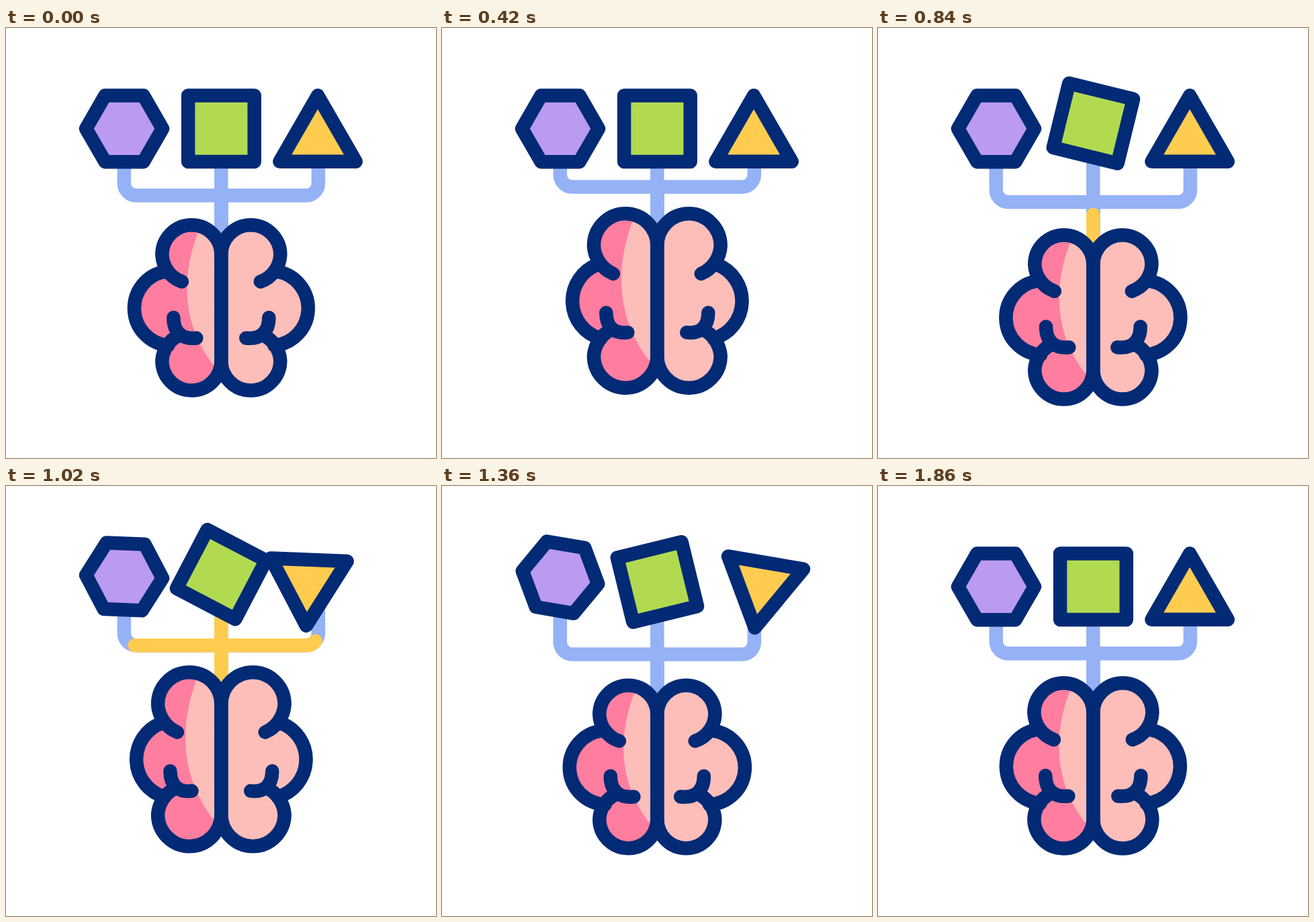
An HTML page that plays this animation: 640x640 px, repeating every 2200 ms.

```html
<!DOCTYPE html>
<html lang="en">
<head>
<meta charset="utf-8">
<title>Thinking in shapes</title>
<style>
  html, body { margin: 0; width: 100%; height: 100%; overflow: hidden; background: #fff; }
  svg { display: block; width: 100%; height: 100%; }
  .line { fill: none; stroke-width: 20.5; stroke-linecap: round; stroke-linejoin: round; }
  .navy { stroke: #032a75; }
  .blue { stroke: #94b2f5; }
  .gold { stroke: #ffcc50; }
  .shape { stroke: #032a75; stroke-width: 20.5; stroke-linejoin: round; }
</style>
</head>
<body>
<svg viewBox="0 0 640 640">
  <defs><clipPath id="half"><path id="halfClip"/></clipPath></defs>
  <g id="wires"></g>
  <g id="shapes">
    <path class="shape" fill="#bb9af1" d="M-57 0L-28.5 -49.4H28.5L57 0L28.5 49.4H-28.5Z"/>
    <path class="shape" fill="#b1da51" d="M-49.3 -49.3H49.3V49.3H-49.3Z"/>
    <path class="shape" fill="#ffcc50" d="M0 -49.3L56.7 49H-56.7Z"/>
  </g>
  <g id="brain">
    <path id="fillL" fill="#fdbeb9"/>
    <path id="fillR" fill="#fdbeb9" transform="matrix(-1 0 0 1 640 0)"/>
    <path id="shade" fill="#ff7d9f" clip-path="url(#half)"/>
    <path id="lineL" class="line navy"/>
    <path id="lineR" class="line navy" transform="matrix(-1 0 0 1 640 0)"/>
  </g>
</svg>
<script>
const LOOP = 2200, STEP = 20, AXIS = 320.3;
const $ = id => document.getElementById(id);
const set = (el, attrs) => { for (const k in attrs) el.setAttribute(k, attrs[k]); };

const smooth = u => u * u * (3 - 2 * u);
const easeIn = u => u * u;
const easeOut = u => u * (2 - u);
const clamp = u => Math.min(1, Math.max(0, u));
const ramp = (t, start, length) => smooth(clamp((t - start) / length));

// keys: [time, value, easing towards this key]
function track(t, keys) {
  if (t <= keys[0][0]) return keys[0][1];
  for (let i = 1; i < keys.length; i++) {
    const [t0, v0] = keys[i - 1], [t1, v1, ease = smooth] = keys[i];
    if (t < t1) return v0 + (v1 - v0) * ease((t - t0) / (t1 - t0));
  }
  return keys[keys.length - 1][1];
}

const LIFT = [[210, 0], [410, -10.5], [670, 27.2], [735, 27], [1000, -10.5], [1190, 17], [1400, 0]];
const SQUASH = [[210, 0], [420, -1], [700, 1], [1010, -1], [1220, 1], [1440, 0]];
const HOP = [[840, 0], [1190, -19.5, easeOut], [1540, 5, easeIn], [1625, -8.6, easeOut], [1850, 0]];

// side: -1 left, 0 stem, 1 right
const wires = [-1, 0, 1].map(side => ({ side }));
for (const color of ["blue", "gold"])
  for (const w of wires) {
    w[color] = document.createElementNS("http://www.w3.org/2000/svg", "path");
    w[color].setAttribute("class", "line " + color);
    $("wires").append(w[color]);
  }

const shapes = [...$("shapes").children].map((el, i) => ({
  el, x: [176, 320.4, 464][i], lead: i === 1 ? 80 : 0
}));

function wirePath(side, bar) {
  const start = `M${AXIS} ${bar + 120}V`;
  if (!side) return start + 150;
  const x = AXIS + side * 144.5;
  return `${start}${bar}H${x - side * 18}A18 18 0 0 ${side < 0 ? 1 : 0} ${x} ${bar - 18}V150`;
}

function drawWires(t, lift) {
  const bar = 249.3 + lift * (lift < 0 ? 1.24 : 0.69);
  for (const { side, blue, gold } of wires) {
    const d = wirePath(side, bar);
    const early = side ? 0 : 95, length = side ? 340 : 240;
    const head = ramp(t + early, 756, 400), tail = ramp(t + early, 1008, 400);
    const right = side > 0 ? 1 : 0;
    const from = tail * length + 6 * right * Math.sin(Math.PI * tail);
    const to = head * length + 18 * right * Math.sin(Math.PI * head);
    set(blue, { d });
    set(gold, {
      d,
      "stroke-dasharray": `${Math.max(0.01, to - from)} 9999`,
      "stroke-dashoffset": -from,
      visibility: to - from > 0.5 ? "visible" : "hidden"
    });
  }
}

function drawBrain(lift, s) {
  const cx = 276 + 3.2 * s, rx = 320 - cx, ry = 44.3 - 3.5 * s, left = cx - rx;
  const top = -79 + 3 * s, low = 78.7 - 3 * s;
  const lobe = `A${rx} ${ry} 0 0 `;
  const upper = `M320 ${top}${lobe}0 ${cx} ${top - ry}${lobe}0 ${left} ${top}`;
  const lower = `${lobe}1 ${cx} ${low + ry}${lobe}1 ${left} ${low}`;

  // side lobe: circle through both joints and the leftmost point
  const j1 = [236 + 5 * s, -54], j2 = [241 + 5 * s, 56];
  const sag = (j1[0] + j2[0]) / 2 - (191 - 3 * s);
  const r = (55 * 55 + sag * sag) / (2 * sag);
  const side = `${j1}A${r} ${r} 0 ${sag > r ? 1 : 0} 0 ${j2}`;

  const fill = `${upper}L${side}L${left} ${low}${lobe}0 ${cx} ${low + ry}${lobe}0 320 ${low}Z`;
  const x1 = 249 + 5 * s, y1 = 14.5 - 3 * s, x2 = 283 + 7 * s, y2 = 45 - 2 * s;
  const line = [
    `${upper}${lobe}0 ${261.5 + 7 * s} ${-39 + 1.5 * s}`,
    `M${side}`,
    `M320 ${top}V${low}${lower}${lobe}1 ${257 + 5 * s} ${41 - 1.5 * s}`,
    `M${x1} ${y1}C${x1} ${y1 + 20} ${x1 + 11} ${y2 + 2.5} ${x2} ${y2}`
  ].join("");
  const k = 1 - 0.05 * s, dx = 2.5 * s;
  const shade = `M150 ${-150 * k}H${290 + dx}L${288 + dx} ${-118.5 * k}` +
    `C${258 + dx} ${-46.5 * k} ${262 + dx} ${28.5 * k} 312 ${89.5 * k}V${150 * k}H150Z`;

  set($("fillL"), { d: fill });
  set($("fillR"), { d: fill });
  set($("halfClip"), { d: fill });
  set($("shade"), { d: shade });
  set($("lineL"), { d: line });
  set($("lineR"), { d: line });
  set($("brain"), { transform: `translate(${AXIS - 320} ${416.5 + lift})` });
}

function draw(t) {
  const lift = track(t, LIFT);
  drawWires(t, lift);
  drawBrain(lift, track(t, SQUASH));
  for (const { el, x, lead } of shapes) {
    const y = 149.8 + track(t + lead, HOP);
    const turn = 360 * ramp(t + lead, 840, 680);
    set(el, { transform: `translate(${x} ${y}) rotate(${turn})` });
  }
}

const begin = performance.now();
function tick() {
  const t = (performance.now() - begin) % LOOP;
  draw(Math.floor(t / STEP) * STEP);
  requestAnimationFrame(tick);
}
tick();
</script>
</body>
</html>
```
